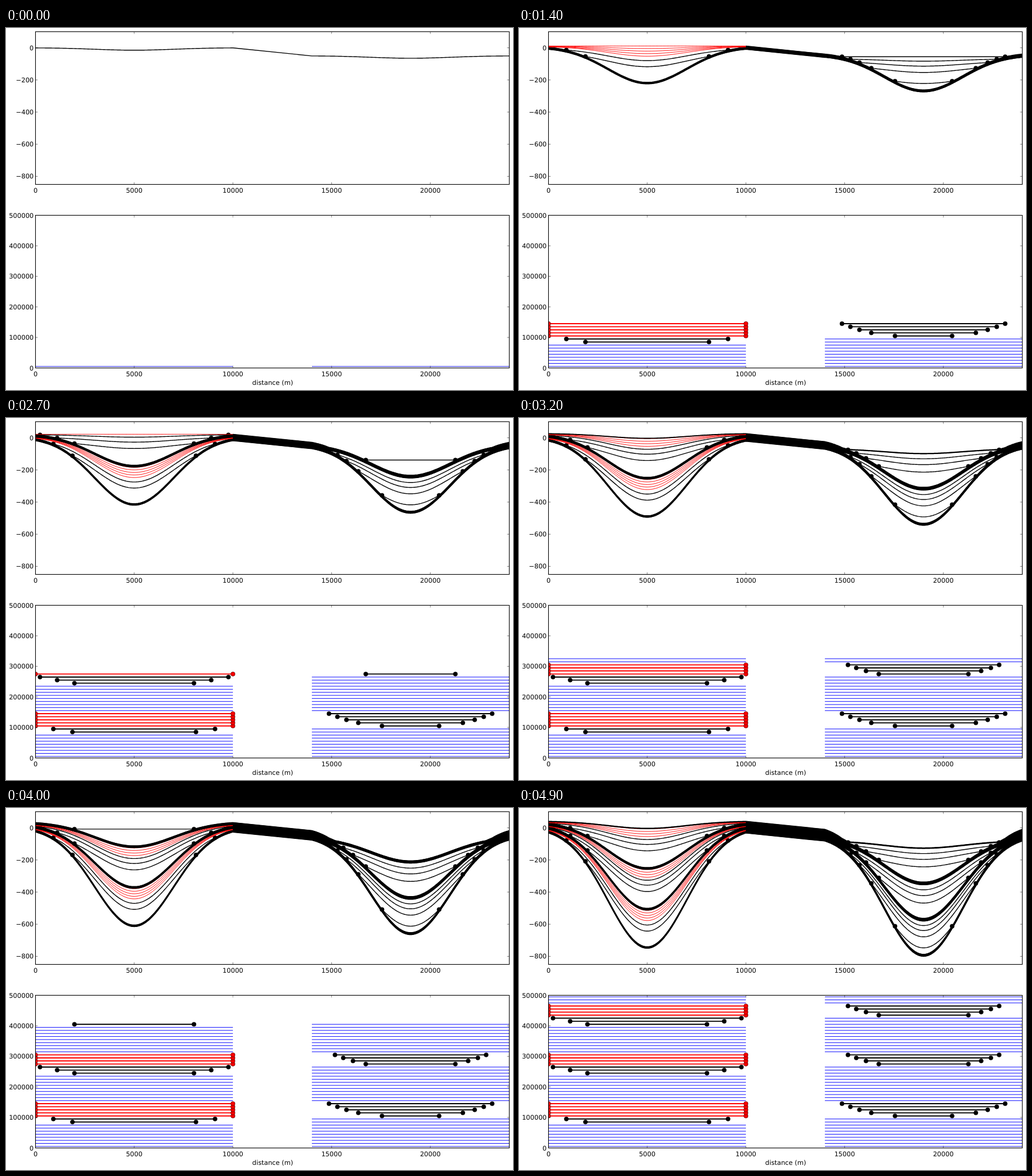
Write an HTML page that moves like this. It is 885 px wide and 633 px high and loops after 5 s.

```html
<!DOCTYPE html>
<html lang="en">
<head>
<meta charset="utf-8">
<title>Basin layers</title>
<style>
html, body { margin: 0; width: 100%; height: 100%; overflow: hidden; background: #fff; }
svg { display: block; width: 100%; height: 100%; }
text { font: 11.3px "DejaVu Sans", sans-serif; text-rendering: geometricPrecision; }
</style>
</head>
<body>
<svg viewBox="0 0 885 633">
  <defs>
    <clipPath id="topClip"><rect x="51.5" y="6.5" width="827" height="267"/></clipPath>
    <clipPath id="lowClip"><rect x="51.5" y="327.5" width="827" height="267"/></clipPath>
  </defs>
  <rect width="885" height="633" fill="#fff"/>
  <g id="section" clip-path="url(#topClip)" fill="none" stroke-linejoin="round"></g>
  <g id="chart" clip-path="url(#lowClip)"></g>
  <g id="axes"></g>
</svg>
<script>
const STEPS = 50, STEP_MS = 100;
const DX = 50, HALF = 5000, COUNT = 2 * HALF / DX + 1;
const RAIN = 1.5, SINK = 15, SIGMA = 2000;
const LEFT = 51.5, WIDTH = 827, HEIGHT = 267, TOP = 6.5, LOW = 327.5;

const px = x => LEFT + x * WIDTH / 24000;
const depthY = h => TOP + (100 - h) * HEIGHT / 950;
const timeY = t => LOW + (500000 - t) * HEIGHT / 500000;
const f = v => v.toFixed(2);
const sinkAt = d => SINK * Math.exp(-d * d / (2 * SIGMA * SIGMA));
const offsets = Array.from({ length: COUNT }, (_, i) => i * DX - HALF);
const sink = offsets.map(sinkAt);

// Half widths of the lake for each filling step; HALF means it is full to the brim.
const basins = [
  { centre: 5000, base: 0, first: [3128, 4095, ...Array(5).fill(HALF)],
    later: [3027, 3902, 4772, ...Array(4).fill(HALF)] },
  { centre: 19000, base: -50, first: [0, 0, 1447, 2647, 3248, 3706, 4133],
    later: [0, 0, 0, 2270, 2917, 3408, 3829] }
];

function lakeWidth(basin, n) {
  const k = n % 16 - 8;
  return k < 0 || k > 6 ? 0 : (n < 16 ? basin.first : basin.later)[k];
}

function heightAt(h, d) {
  const p = (d + HALF) / DX, i = Math.min(Math.floor(p), COUNT - 2);
  return h[i] + (h[i + 1] - h[i]) * (p - i);
}

function buildLayers(basin) {
  let top = offsets.map(() => basin.base);
  return Array.from({ length: STEPS }, (_, n) => {
    // The first layer is the floor itself.
    top = top.map((h, i) => h - sink[i] + RAIN * (n > 0));
    const width = lakeWidth(basin, n);
    const level = width ? heightAt(top, -width) : null;
    if (width) top = top.map((h, i) => Math.abs(offsets[i]) <= width ? Math.max(h, level) : h);
    return { heights: top, width, level, full: width === HALF };
  });
}
basins.forEach(b => b.layers = buildLayers(b));

const line = (x1, y1, x2, y2, color, w) =>
  `<path d="M${f(x1)} ${f(y1)}L${f(x2)} ${f(y2)}" fill="none" stroke="${color}" stroke-width="${w}"/>`;
const dot = (x, y, color) =>
  `<circle cx="${f(x)}" cy="${f(y)}" r="3.75" fill="${color}" stroke="#000" stroke-width=".5"/>`;
const curve = (d, color, w) => `<path d="M${d}" stroke="${color}" stroke-width="${w}"/>`;

function points(basin, n, age) {
  return basin.layers[n].heights.map((h, i) =>
    f(px(basin.centre + offsets[i])) + " " + f(depthY(h - age * sink[i])));
}

function sectionLayer(n, now) {
  const age = now - n;
  const [a, b] = basins.map(basin => points(basin, n, age));
  let out = "";
  if (basins[0].layers[n].full) {
    out += curve([a[COUNT - 1], ...b].join("L"), "#000", 1.4) + curve(a.join("L"), "#f00", 0.95);
  } else {
    out += curve([...a, ...b].join("L"), "#000", 1.4);
  }
  for (const { centre, layers } of basins) {
    const { width, level, full } = layers[n];
    if (!width || full) continue;
    const y = depthY(level - age * sinkAt(width));
    out += dot(px(centre - width), y, "#000") + dot(px(centre + width), y, "#000");
  }
  return out;
}

function chartLayer(n) {
  const y = timeY(5000 + n * 10000);
  return basins.map(({ centre, layers }) => {
    const { width, full } = layers[n];
    const half = width || HALF, x1 = px(centre - half), x2 = px(centre + half);
    if (!width) return line(x1, y, x2, y, "#00f", 0.95);
    const color = full ? "#f00" : "#000";
    return line(x1, y, x2, y, color, 1.9) + dot(x1, y, color) + dot(x2, y, color);
  }).join("");
}

function axes(top, yOf, ticks) {
  const right = LEFT + WIDTH, bottom = top + HEIGHT, len = 3.8;
  const tick = (...p) => line(...p, "#000", 0.5);
  const label = (x, y, text, anchor) =>
    `<text x="${f(x)}" y="${f(y)}" text-anchor="${anchor}">${String(text).replace("-", "\u2212")}</text>`;
  let out = `<rect x="${LEFT}" y="${top}" width="${WIDTH}" height="${HEIGHT}" fill="none" stroke="#000" stroke-width="1.1"/>`;
  for (let v = 0; v <= 20000; v += 5000) {
    const x = px(v);
    out += tick(x, top, x, top + len) + tick(x, bottom, x, bottom - len) + label(x, bottom + 14.4, v, "middle");
  }
  for (const v of ticks) {
    const y = yOf(v);
    out += tick(LEFT, y, LEFT + len, y) + tick(right, y, right - len, y) + label(48.3, y + 4, v, "end");
  }
  return out;
}

const get = id => document.getElementById(id);
get("axes").innerHTML =
  axes(TOP, depthY, [0, -200, -400, -600, -800]) +
  axes(LOW, timeY, [0, 1, 2, 3, 4, 5].map(k => k * 100000)) +
  `<text x="465.5" y="624" text-anchor="middle">distance (m)</text>`;

let shown = -1;
function draw(ms) {
  const now = Math.floor(ms / STEP_MS) % STEPS;
  if (now === shown) return;
  shown = now;
  const steps = Array.from({ length: now + 1 }, (_, n) => n);
  get("section").innerHTML = steps.map(n => sectionLayer(n, now)).join("");
  get("chart").innerHTML = steps.map(chartLayer).join("");
}

const start = performance.now();
function loop() {
  draw(performance.now() - start);
  requestAnimationFrame(loop);
}
loop();
</script>
</body>
</html>
```
